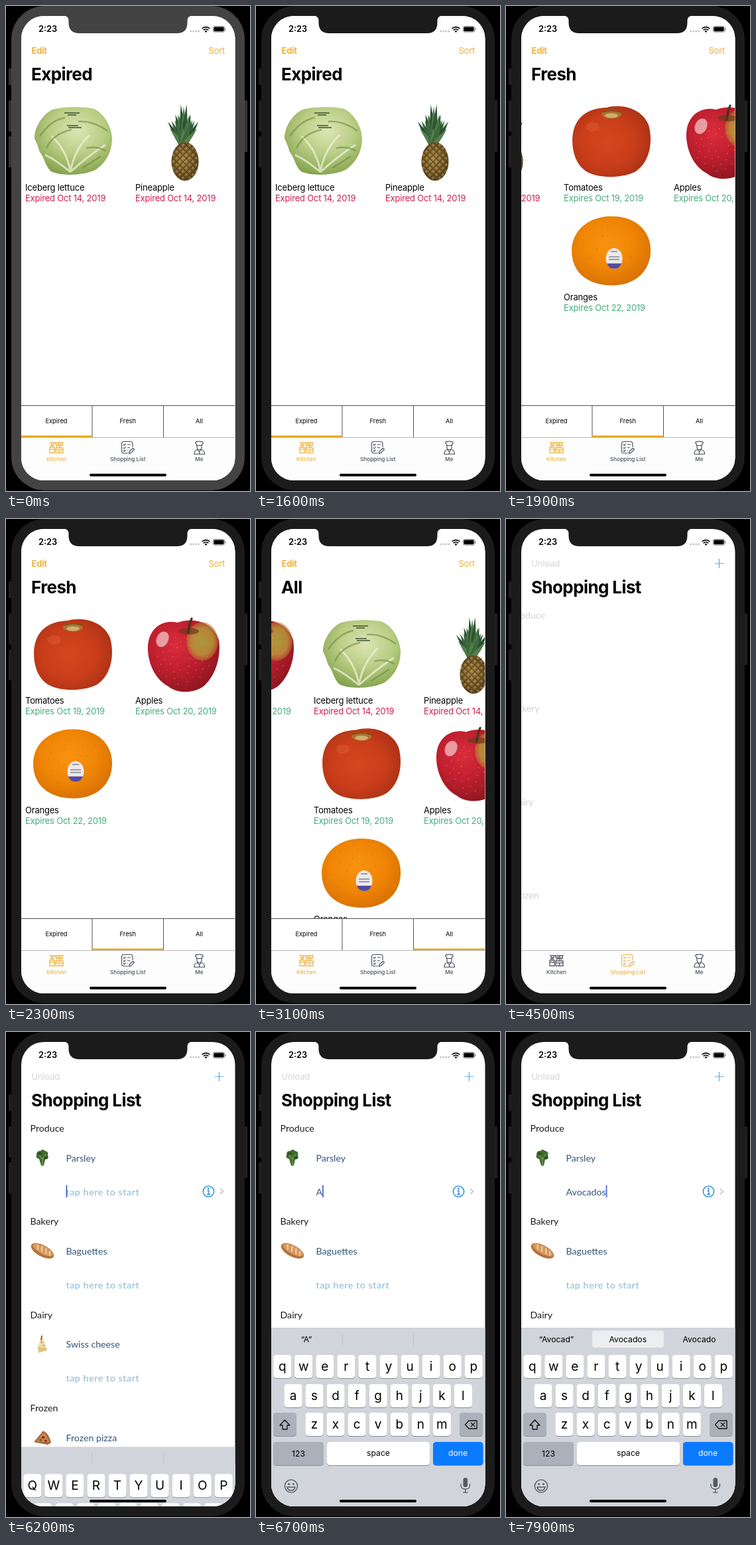
Recreate the animation shown at these times as an HTML page. Size 368 by 730 pixels, loop 8 s.

```html
<!DOCTYPE html>
<html lang="en">
<head>
<meta charset="utf-8">
<title>Kitchen list</title>
<style>
html,body{margin:0;width:100%;height:100%;overflow:hidden;background:#000}
svg{display:block;width:368px;height:730px;font-family:Inter,Roboto,sans-serif}
.mid{text-anchor:middle}
.nav{font-size:13px;letter-spacing:-.25px}
.title{font-size:26px;font-weight:700;letter-spacing:-.6px}
.item{font-size:12.9px;letter-spacing:-.15px}
.seg{font-size:9.3px}
.tab{font-size:8.2px;font-weight:500}
.list{font-family:Lato,"Open Sans",sans-serif;font-size:14.2px}
.hint{fill:#8cb7d2;letter-spacing:.6px}
.key{font-size:19px;text-anchor:middle}
.small{font-size:12.2px;text-anchor:middle}
</style>
</head>
<body>
<svg id="stage" viewBox="0 0 368 730" xmlns="http://www.w3.org/2000/svg"></svg>
<script>
const LOOP = 8000, PAGE = 323, ORANGE = '#f0b23c', SLATE = '#48505c';
const svg = document.getElementById('stage');
const $ = id => document.getElementById(id);
const range = n => [...Array(n).keys()];
const text = (x, y, s, cls, attrs = '') => `<text x="${x}" y="${y}" class="${cls}" ${attrs}>${s}</text>`;
const rect = (x, y, w, h, fill, r = 0, attrs = '') =>
  `<rect x="${x}" y="${y}" width="${w}" height="${h}" rx="${r}" fill="${fill}" ${attrs}/>`;
const oval = (x, y, rx, ry, fill, attrs = '') =>
  `<ellipse cx="${x}" cy="${y}" rx="${rx}" ry="${ry}" fill="${fill}" ${attrs}/>`;
const line = (d, color, w = 1, attrs = '') =>
  `<path d="${d}" fill="none" stroke="${color}" stroke-width="${w}" ${attrs}/>`;
const radial = (id, cx, cy, stops) => `<radialGradient id="${id}" cx="${cx}" cy="${cy}" r=".7">` +
  stops.map((c, i) => `<stop offset="${i / (stops.length - 1)}" stop-color="${c}"/>`).join('') + '</radialGradient>';

const defs = `<defs>
<clipPath id="screen"><rect x="23" y="15" width="322.5" height="699" rx="34"/></clipPath>
<clipPath id="pageArea"><rect x="23" y="122" width="322.5" height="479"/></clipPath>
${radial('gLettuce', .55, .35, ['#dbe6b4', '#b9cd84', '#7f9f48'])}
${radial('gTomato', .45, .5, ['#d2481f', '#c93d1a', '#9c2d14'])}
${radial('gApple', .38, .35, ['#da2c3c', '#bf1f2e', '#8c1620'])}
${radial('gOrange', .45, .4, ['#f8930f', '#f08505', '#d06c04'])}
${radial('gGreen', .5, .5, ['#a9ae3f', '#b9963a', '#c0602a00'])}
${radial('gPine', .45, .45, ['#a58345', '#7f5f2b', '#4d3b1b'])}
<pattern id="scales" width="7" height="7" patternUnits="userSpaceOnUse" patternTransform="rotate(45)">
<path d="M0 0H7M0 0V7" stroke="#453716" stroke-width="2.2"/><circle cx="3.7" cy="3.7" r="1.1" fill="#c8a860"/></pattern>
</defs>`;

const leaf = (x, y, spread, fill) =>
  `<path d="M${-spread} 6Q${x * .5 - 4} ${(y + 6) / 2} ${x} ${y}Q${x * .5 + 5} ${(y + 6) / 2} ${spread} 6Z" fill="${fill}"/>`;

const food = {
  lettuce: `<path d="M-58-5C-58-24-44-42-31-48C-12-53 18-53 32-49C47-42 59-22 59-3C58 20 47 33 35 42C15 52-18 52-33 45C-42 37-43 24-50 16Q-53 6-58-5Z" fill="url(#gLettuce)"/>` +
    line('M-4 46Q-8 15-32-8M-4 46Q2 12 25-10M-4 46Q22 22 49 5M-4 46Q-22 30-42 20', '#eef1d8', 3, 'opacity=".75"') +
    line('M-50-8Q-34-32-12-36M-40 10Q-30-12-2-18M52-16Q30-32 8-30M50 14Q34 6 20 10M14 40Q30 30 42 22', '#66883a', 2.5, 'opacity=".55"') +
    line('M-13-43h23M-8-40h13M-9-24h17M-7-21h20', '#3b5132', 1.5),
  pineapple: range(9).map(i => {
      const k = i - 4;
      return leaf(k * 5.8, -30 - (16 - k * k) * .9 + (i % 2) * 5, 6, i % 2 ? '#356139' : '#274d2c');
    }).join('') +
    range(7).map(i => {
      const k = i - 3;
      return leaf(k * 4.4 + 1, -59 + k * k * 3 + (i % 2) * 6, 5, i % 2 ? '#4b7648' : '#2c5632');
    }).join('') +
    [-20, -11, 0, 12, 21].map((x, i) => leaf(x, -20 - (i % 2) * 12, 5, i % 2 ? '#3b693d' : '#577e4c')).join('') +
    '<g id="pineBody">' + oval(3, 30, 20.5, 29, 'url(#gPine)') + oval(3, 30, 20.5, 29, 'url(#scales)', 'opacity=".85"') + '</g>',
  tomato: `<path d="M-59-2C-58-38-35-50-8-51C12-57 45-52 56-25C63 0 58 30 38 44C20 56-25 57-42 42C-54 32-59 15-59-2Z" fill="url(#gTomato)"/>` +
    oval(0, -41, 15, 6.5, '#a8742c') + oval(0, -39, 10, 3.5, '#d0ad72') + line('M-13-44Q0-49 14-44', '#6c4a1a', 1.5) +
    oval(-28, -22, 10, 7, '#e2673b', 'opacity=".35"'),
  apple: `<path id="appleBody" d="M-53-12C-52-40-30-54-8-48C10-56 45-52 54-22C58 5 48 32 33 46C20 58-8 60-22 48C-42 38-54 12-53-12Z" fill="url(#gApple)"/>` +
    oval(29, -20, 24, 29, 'url(#gGreen)', 'opacity=".85"') +
    range(44).map(i => {
      const a = i * 2.4, r = Math.sqrt(i + 3) * 6;
      return oval((r * Math.cos(a)).toFixed(1), (6 + r * Math.sin(a)).toFixed(1), .7, .7, '#eba264', 'opacity=".7"');
    }).join('') +
    oval(-31, -23, 9, 12, '#f6cfd0', 'opacity=".7" transform="rotate(25 -31 -23)"') +
    oval(9, -35, 15, 5, '#6d3a1c', 'opacity=".7"') + line('M8-33Q9-45 13-54', '#49331f', 3.2, 'stroke-linecap="round"'),
  orange: `<path d="M-60 0C-60-28-38-50-4-52C36-54 59-30 59-2C60 28 38 51 4 52C-36 53-60 32-60 0Z" fill="url(#gOrange)"/>` +
    range(22).map(i => oval((52 * Math.cos(i * 2.4) * Math.sqrt(i / 22)).toFixed(1),
      (44 * Math.sin(i * 2.4) * Math.sqrt(i / 22)).toFixed(1), .9, .9, '#d87806')).join('') +
    oval(4, 11.5, 12.5, 15.5, '#ece9ec') + '<path d="M-7 19H15Q12 27 4 27Q-4 27-7 19Z" fill="#514c9c"/>' +
    line('M-1 1h10M-4 9h16M-4 13h16', '#85808d', 1.6)
};

const stock = {
  lettuce: ['Iceberg lettuce', 'Expired Oct 14, 2019'],
  pineapple: ['Pineapple', 'Expired Oct 14, 2019'],
  tomato: ['Tomatoes', 'Expires Oct 19, 2019'],
  apple: ['Apples', 'Expires Oct 20, 2019'],
  orange: ['Oranges', 'Expires Oct 22, 2019']
};
const card = (kind, i) => {
  const [name, date] = stock[kind];
  const color = date.startsWith('Expired') ? '#d01f50' : '#42ac7c';
  return `<g transform="translate(${i % 2 * 166} ${(i >> 1) * 164.5})">
<g transform="translate(101 204)">${food[kind]}</g>${text(29, 278, name, 'item')}${text(29, 294, date, 'item', `fill="${color}"`)}</g>`;
};
const page = (kinds, i) => `<g transform="translate(${i * PAGE} 0)">${kinds.map(card).join('')}</g>`;
const pages = [['lettuce', 'pineapple'], ['tomato', 'apple', 'orange'], Object.keys(stock)];
const names = ['Expired', 'Fresh', 'All'];
const centers = [76, 183.8, 291.5];

const kitchen = `<g id="kitchen">${rect(23, 15, 323, 634, '#fff')}
${text(38.5, 72, 'Edit', 'nav', `fill="${ORANGE}" font-weight="700"`)}
${text(330, 72, 'Sort', 'nav', `fill="${ORANGE}" text-anchor="end"`)}
${text(38, 112, '', 'title', 'id="title"')}
<g clip-path="url(#pageArea)"><g id="pages">${pages.map(page).join('')}</g></g>
${line('M23 601.5H346M130 601V649M237.5 601V649', '#555')}
${names.map((n, i) => text(centers[i], 628, n, 'seg mid')).join('')}
${rect(0, 646.5, 107.5, 2.8, '#eaa81c', 0, 'id="mark"')}</g>`;

const thumbs = [
  `<path d="M-2 12L-5 2Q-11 1-9-4Q-9-11-3-10Q0-14 4-10Q10-9 8-3Q11 2 4 3L2 12Z" fill="#3f6b2e"/>` +
    line('M0 13V0M-5-4L0 3L5-5', '#6f9450', 1.5) + oval(-4, -6, 3, 2, '#2b5121') + oval(5, 0, 3, 2, '#2b5121'),
  `<g transform="rotate(28)">${oval(0, 0, 19, 8.5, '#b8713a')}${oval(0, -1.5, 17, 6, '#d39a62')}` +
    line('M-11-5l4 7M-4-6l4 8M3-6l4 8M10-5l3 6', '#f0cfa2', 2) + '</g>',
  `<path d="M-1-13L7 9L-6 13L-7 4Z" fill="#efdca6"/><path d="M-7 4L6 6L7 9L-6 13Z" fill="#e2c47e"/>` +
    oval(-1, -3, 1.5, 1.5, '#c9a55b') + oval(2, 2, 1.4, 1.4, '#c9a55b') + line('M-1-13L-2-6', '#8b6a3a', 2),
  `<path d="M-13 7L1-10Q10-6 13 8L8 11Z" fill="#a9683a"/><path d="M-9 6L1-7Q7-3 10 7Z" fill="#cc8a4c"/>` +
    oval(1, 0, 2.4, 2, '#8a2f22') + oval(5, 5, 2, 1.6, '#8a2f22') + oval(-3, 4, 2, 1.4, '#5b5a2b')
];
const sections = [['Produce', 'Parsley'], ['Bakery', 'Baguettes'], ['Dairy', 'Swiss cheese'], ['Frozen', 'Frozen pizza']];
const section = ([head, item], i) => {
  const y = i * 140.4;
  return `<g class="head">${text(36.5, 150 + y, head, 'list', 'fill="#1c1c1c"')}</g>
<g class="row"><g transform="translate(55 ${189 + y})">${thumbs[i]}</g>${text(90.5, 194.5 + y, item, 'list', 'fill="#33567c"')}
${text(90.5, 245.5 + y, 'tap here to start', 'list hint', i ? '' : 'id="hint"')}</g>`;
};
const shopping = `<g id="shopping">
${text(38.5, 72, 'Unload', 'nav', 'fill="#dcdcde" font-weight="500"')}
${line('M314.5 67H328.5M321.5 60V74', '#5fabdf', 1.2)}
${text(38, 112, 'Shopping List', 'title')}
${sections.map(section).join('')}
<g id="edit">${text(90.5, 245.5, '', 'list', 'id="typed" fill="#33567c"')}
${rect(0, 230.5, 1.7, 18.5, '#3b62da', 0, 'id="caret"')}
<circle cx="305.5" cy="240" r="8.2" fill="none" stroke="#1c7fe0" stroke-width="1.3"/>
<circle cx="305.3" cy="236" r="1.2" fill="#1c7fe0"/>${line('M303.5 239H305.8V244.3M303 244.3H308.3', '#1c7fe0', 1.3)}
${line('M323 236L327.5 240L323 244', '#bfc0c4', 1.6)}</g></g>`;

const icons = [
  line('M66 657H87M68 657v3h4v-3M75 657v3h4v-3M82 657l-1.5 4h5l-1-4M66 664H73V672.5H66ZM66 667H73M75 665H86V672.5H75ZM75 668H86M80.5 668V672.5M76 664.5l1-3h3l1 3M68 663.5v-2h3v2M83 664v-3', 'currentColor', 1.25),
  line('M191 664V659Q191 655.5 187 655.5H178Q174.5 655.5 174.5 659V669.5Q174.5 673 178 673H184M177 660l1.3 1.4 2.2-2.6M177 664.7l1.3 1.4 2.2-2.6M177 669l1.3 1.4 2.2-2.6M183 660H188M183 664.7H187M183 669H184M185.5 673.5L186 670.5L191.5 665.5L193.5 667.5L188.3 672.6Z', 'currentColor', 1.15, 'stroke-linejoin="round"'),
  line('M287.5 661.5V659.3Q284.8 658.5 286 656.5Q287.5 655 289 656Q291.5 654 294 656Q296.5 655 297.2 657Q297.5 659 295.5 659.3V661.5ZM288 661.5V664.5Q288.5 668 291.5 668T295 664.5V661.5M289 667.5Q284 668.5 284 674.5H299.5Q299.5 668.5 294.2 667.5M289 668L291.5 671L294 668M291.5 671V674', 'currentColor', 1.15)
];
const tabs = `<g id="tabs">${rect(23, 649, 323, 66, '#fdfdfd')}${line('M23 649.5H346', '#b9b9bb')}
${['Kitchen', 'Shopping List', 'Me'].map((n, i) =>
  `<g id="tab${i}">${icons[i]}${text(centers[i], 685, n, 'tab mid', 'fill="currentColor"')}</g>`).join('')}</g>`;

const cap = (x, y, w, fill = '#fff', id = '') => rect(x, y + 1, w, 35, '#8b8d93', 4.5) + rect(x, y, w, 35, fill, 4.5, id);
const keyRow = (letters, x0, y) => [...letters].map((c, i) => {
  const x = x0 + i * 32.05;
  return cap(x - 13.6, y, 27.2) + text(x, y + 23.5, c, 'key', 'data-key=""');
}).join('');
const board = `<g id="board">${rect(23, 445, 323, 285, '#d1d4db')}
<g id="bars">${line('M130 455V472M237.5 455V472', '#bcc0c8')}</g>
${rect(130, 449.5, 108, 25.5, '#eceef1', 4, 'id="pill"')}
${centers.map((x, i) => text(x, 466.5, '', 'small', `id="guess${i}"`)).join('')}
${keyRow('qwertyuiop', 39.8, 486)}${keyRow('asdfghjkl', 56, 530)}${keyRow('zxcvbnm', 88, 573)}
${cap(26, 573, 35, '#abb0ba', 'id="shift"')}
<path id="arrow" d="M43.5 584L51 592H47V598H40V592H36Z" stroke="#111" stroke-width="1.3" stroke-linejoin="round"/>
${cap(307, 573, 35, '#abb0ba')}
${line('M321 585H333V597H321L315.5 591ZM324 588L330 594M330 588L324 594', '#111', 1.3, 'stroke-linejoin="round"')}
${cap(26, 617, 76, '#abb0ba')}${text(64, 638.5, '123', 'small')}
${cap(107, 617, 155)}${text(184.5, 638, 'space', 'small')}
${cap(267, 617, 75.5, '#0a7aff')}${text(304.5, 638, 'done', 'small', 'fill="#fff"')}
<circle cx="53" cy="683.5" r="9.6" fill="none" stroke="#555a63" stroke-width="1.4"/>
<circle cx="49.6" cy="680.5" r="1.4" fill="#555a63"/><circle cx="56.4" cy="680.5" r="1.4" fill="#555a63"/>
<path d="M47 685H59Q58 690 53 690T47 685Z" fill="none" stroke="#555a63" stroke-width="1.3"/>
${rect(312.5, 671, 6.6, 14, '#555a63', 3.3)}
${line('M309 680V682.5Q309.5 688 315.8 688T322.5 682.5V680M315.8 688V693M312 693.2H319.6', '#555a63', 1.3)}</g>`;

const status = `${text(49, 39.3, '2:23', '', 'font-size="12.8" font-weight="600"')}
${range(4).map(i => oval(278.7 + i * 4, 38, 1.4, 1.4, '#c4c4c6')).join('')}
${line('M295.6 34a8.6 8.6 0 0 1 11.8 0M297.8 36.3a5.4 5.4 0 0 1 7.4 0', '#000', 1.7)}
<path d="M301.5 40l-1.9-2a2.7 2.7 0 0 1 3.8 0z"/>
${rect(312.3, 30.5, 17.4, 8.8, 'none', 2.4, 'stroke="#777" stroke-width=".8"')}${rect(313.4, 31.6, 15.2, 6.6, '#000', 1.4)}
${rect(330.4, 33.3, 1.2, 3.2, '#777', .6)}`;

svg.innerHTML = `${defs}${rect(0, 0, 368, 730, '#000')}
<g id="sides">${rect(4, 94, 6, 25, 'inherit', 1)}${rect(4, 142, 6, 47, 'inherit', 1)}${rect(4, 196, 6, 47, 'inherit', 1)}${rect(358, 142, 6, 78, 'inherit', 1)}</g>
<rect id="body" x="8" y="0" width="352" height="729" rx="50"/>
<g clip-path="url(#screen)">${rect(23, 15, 323, 700, '#fff')}${shopping}${kitchen}${tabs}${board}${status}
${rect(126, 704, 116, 4, '#000', 2)}</g>
<path id="notch" d="M87 14.5q7.500.5 7.500 7.500v3q0 16 16 16H258q15.500 0 15.500-16v-3q0-7 7.500-7.500Z"/>`;

const clamp = v => Math.max(0, Math.min(1, v));
const part = (t, start, dur) => clamp((t - start) / dur);
const inOut = p => p < .5 ? 4 * p ** 3 : 1 - 4 * (1 - p) ** 3;
const outQuad = p => 1 - (1 - p) ** 2;
const set = (id, key, v) => $(id).setAttribute(key, v);
const show = (id, on) => set(id, 'display', on ? 'inline' : 'none');
const label = (id, s) => { if ($(id).textContent !== s) $(id).textContent = s; };
const heads = svg.querySelectorAll('.head'), rows = svg.querySelectorAll('.row'), keys = svg.querySelectorAll('[data-key]');
keys.forEach(k => k.dataset.key = k.textContent);

const TAP = [1640, 2840], LIST = 3870, EDIT = 6127, TYPE = 6680, STEP = 190;

function enter(nodes, p) {
  nodes.forEach(n => {
    n.setAttribute('transform', `translate(${-36 * (1 - p)} 0)`);
    n.setAttribute('opacity', p);
  });
}

function typedAt(t) {
  if (t >= 7840) return 'Avocados';
  return 'Avocad'.slice(0, Math.max(0, Math.floor((t - TYPE) / STEP) + 1));
}

function draw(t) {
  const dark = t >= 1600;
  ['body', 'notch'].forEach(id => set(id, 'fill', dark ? '#1b1b1b' : '#434343'));
  set('sides', 'fill', dark ? '#1f1f1f' : '#343434');

  const tab = TAP.filter(s => t >= s).length;
  const off = PAGE * TAP.reduce((sum, s) => sum + inOut(part(t, s, 405)), 0);
  set('pages', 'transform', `translate(${-off} 0)`);
  label('title', names[tab]);
  set('mark', 'x', 22.5 + tab * 107.6);

  const fade = part(t, LIST, 330);
  set('kitchen', 'opacity', 1 - fade);
  show('kitchen', fade < 1);
  show('shopping', fade > 0);
  const active = t >= LIST ? 1 : 0;
  range(3).forEach(i => set('tab' + i, 'color', i === active ? ORANGE : SLATE));
  enter(heads, part(t, 4400, 500));
  enter(rows, part(t, 4500, 550));

  const editing = t >= EDIT;
  show('edit', editing);
  show('board', editing);
  if (!editing) { show('hint', true); return; }
  set('board', 'transform', `translate(0 ${270 * (1 - outQuad(part(t, EDIT, 400)))})`);

  const word = typedAt(t), n = word.length, done = n === 8;
  show('hint', n === 0);
  label('typed', word);
  set('caret', 'x', 90.5 + (n ? $('typed').getComputedTextLength() : 0));
  keys.forEach(k => {
    const c = n ? k.dataset.key : k.dataset.key.toUpperCase();
    if (k.textContent !== c) k.textContent = c;
  });
  set('shift', 'fill', n ? '#abb0ba' : '#fff');
  set('arrow', 'fill', n ? 'none' : '#111');
  show('bars', n < 6);
  show('pill', n >= 6);
  label('guess0', n ? `“${done ? 'Avocad' : word}”` : '');
  label('guess1', n >= 4 ? 'Avocados' : '');
  label('guess2', n >= 4 ? 'Avocado' : '');
}

const began = performance.now();
function tick() {
  draw((performance.now() - began) % LOOP);
  requestAnimationFrame(tick);
}
tick();
</script>
</body>
</html>
```
